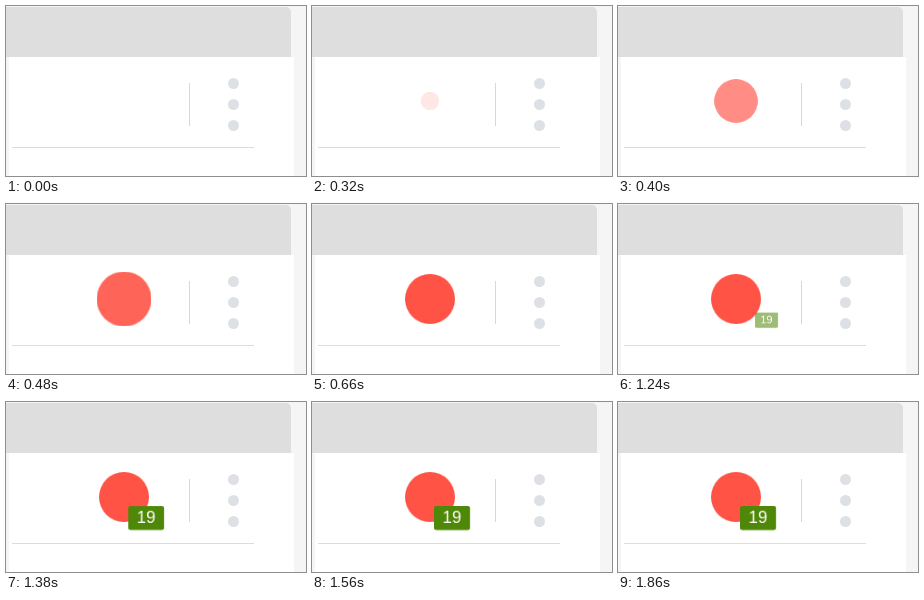
Write an HTML page that moves like this. It is 300 px wide and 170 px high and loops after 3.1 s.

```html
<!DOCTYPE html>
<html lang="en">
<head>
<meta charset="utf-8">
<title>Toolbar badge</title>
<style>
  html, body { margin: 0; width: 100%; height: 100%; overflow: hidden; background: #f5f5f5; }
  .stage { position: relative; width: 300px; height: 170px; overflow: hidden; background: #f5f5f5; }
  .stage * { position: absolute; box-sizing: border-box; }

  .tab { left: 0; top: 1px; width: 285px; height: 50px; border-radius: 0 5px 0 0; background: #dedede; }
  .bar { left: 3px; top: 51px; width: 285px; height: 119px; background: #fff; }
  .rule { left: 6px; top: 141px; width: 242px; height: 1px; background: #dcdcdc; }
  .split { left: 183px; top: 77px; width: 1px; height: 43px; background: #d8d8d8; }
  .dot { left: 222px; width: 11px; height: 11px; border-radius: 50%; background: #dde1e6; }

  .icon { left: 93px; top: 70px; width: 50px; height: 50px; border-radius: 50%; background: #ff5346; }
  .badge {
    left: 122px; top: 104px; width: 36px; height: 24px; border-radius: 2px;
    background: #4f8708; color: #fff; text-align: center;
    font: 17px/24px "Liberation Sans", Arial, sans-serif;
    transform-origin: 41px 12.5px;
  }

  .icon, .badge, .rule { animation: 3100ms linear infinite; }
  .icon { animation-name: pop; }
  .badge { animation-name: count; }
  .rule { animation-name: tint; }

  @keyframes pop {
    0%, 10.32% { opacity: 0; transform: scale(.36); }
    10.322% { opacity: .13; transform: scale(.36); animation-timing-function: ease-out; }
    15.484% { opacity: .9; transform: scale(1.1); animation-timing-function: ease-in-out; }
    21.29%, 100% { opacity: 1; transform: none; }
  }

  /* The badge grows out of a point to its right. */
  @keyframes count {
    0%, 36.127% { opacity: 0; transform: scale(.32); }
    36.129% { opacity: .08; transform: scale(.32); }
    40% { opacity: .55; transform: scale(.63); }
    43.871% { opacity: 1; transform: scale(.95); animation-timing-function: ease-out; }
    46.452% { opacity: 1; transform: scale(1.06); animation-timing-function: ease-in-out; }
    50.323%, 100% { opacity: 1; transform: none; }
  }

  @keyframes tint {
    0%, 59.998% { background: #dcdcdc; }
    60%, 100% { background: #ecd6d6; }
  }
</style>
</head>
<body>
<div class="stage">
  <div class="tab"></div>
  <div class="bar"></div>
  <div class="rule"></div>
  <div class="split"></div>
  <div class="dot" style="top:71.5px"></div>
  <div class="dot" style="top:93px"></div>
  <div class="dot" style="top:114px"></div>
  <div class="icon"></div>
  <div class="badge">19</div>
</div>
</body>
</html>
```
